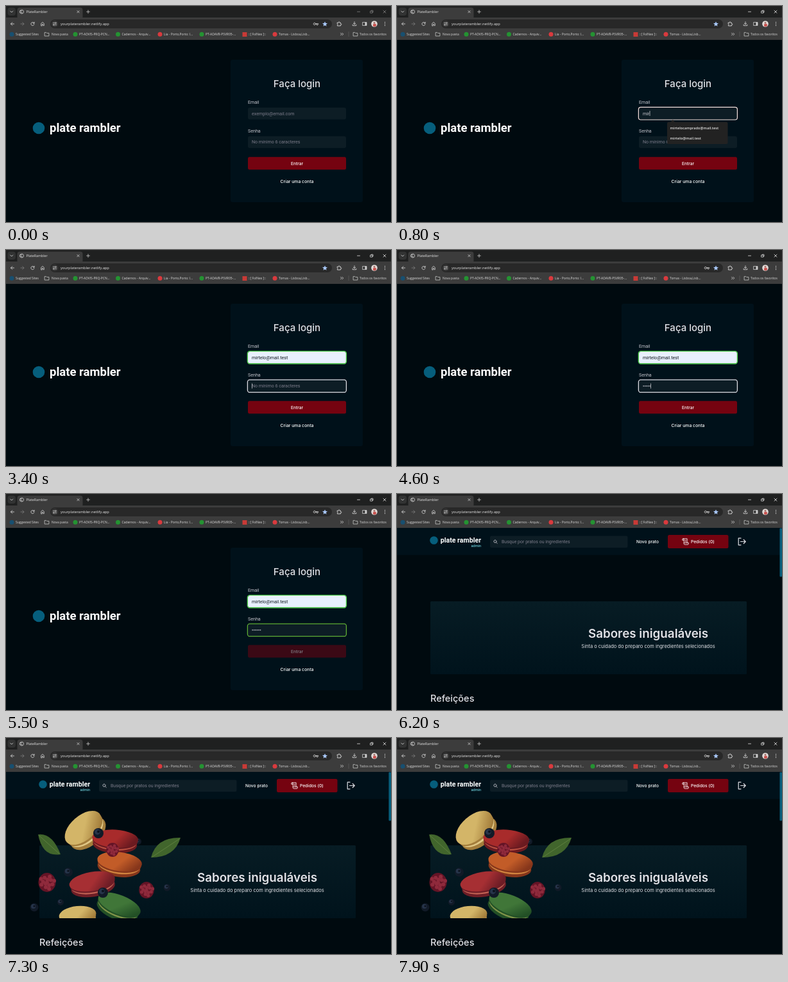
Recreate the animation shown at these times as an HTML page with a canvas. Size 600 by 338 pixels, loop 8 s.

```html
<!DOCTYPE html>
<html lang="pt-BR">
<head>
<meta charset="utf-8">
<title>PlateRambler</title>
<style>
html, body { margin: 0; width: 100%; height: 100%; overflow: hidden; background: #000a0f; }
canvas { display: block; width: 600px; height: 338px; }
</style>
</head>
<body>
<canvas id="stage"></canvas>
<script>
const W = 600, H = 338, LOOP = 8000;
const canvas = document.getElementById('stage');
const ratio = window.devicePixelRatio || 1;
canvas.width = W * ratio;
canvas.height = H * ratio;
const ctx = canvas.getContext('2d');

const UI = '"Open Sans", sans-serif';
const BODY = 'Roboto, sans-serif';
const HEAD = 'Inter, sans-serif';
const BRAND = 'plate rambler';
const USER = 'mirtelo';
const EMAIL = USER + '@mail.test';

// Moments of the story, in ms
const FOCUS = 200, KEYS = [400, 600, 800, 1000, 1200, 1400, 1600];
const HOVER = 2700, PICK = 2900, PASS_FOCUS = 3200, PASS_KEYS = 3700, KEY_GAP = 200;
const SUBMIT = 5350, HOME = 6200, ALERT = 6400, PHOTO = 6900, CLOSE = 7100;

function rect(x, y, w, h, color, r = 0) {
  ctx.fillStyle = color;
  ctx.beginPath();
  ctx.roundRect(x, y, w, h, r);
  ctx.fill();
}

function ring(x, y, w, h, color, r, width = 1) {
  ctx.strokeStyle = color;
  ctx.lineWidth = width;
  ctx.beginPath();
  ctx.roundRect(x, y, w, h, r);
  ctx.stroke();
}

function oval(x, y, rx, ry, color, angle = 0) {
  ctx.fillStyle = color;
  ctx.beginPath();
  ctx.ellipse(x, y, rx, ry, angle, 0, Math.PI * 2);
  ctx.fill();
}

const dot = (x, y, r, color) => oval(x, y, r, r, color);

function line(path, color, width = 0.9, x = 0, y = 0) {
  ctx.save();
  ctx.translate(x, y);
  ctx.strokeStyle = color;
  ctx.lineWidth = width;
  ctx.lineCap = ctx.lineJoin = 'round';
  ctx.stroke(new Path2D(path));
  ctx.restore();
}

function shape(path, color) {
  ctx.fillStyle = color;
  ctx.fill(new Path2D(path));
}

function text(str, x, y, size, color, family = UI, weight = 400, align = 'left') {
  ctx.font = `${weight} ${size}px ${family}`;
  ctx.fillStyle = color;
  ctx.textAlign = align;
  ctx.fillText(str, x, y);
  return ctx.measureText(str).width;
}

function folder(x, y) {
  line('M-3.4 2.6V-2.6H-.8L.2-1.6H3.4V2.6Z', '#c4c7c5', 0.8, x, y);
}

function drawBrowser(t) {
  const icon = '#d0d0d0';
  rect(0, 0, W, 53, '#3c3c3c');
  rect(0, 0, W, 18, '#1f2020');

  rect(2.5, 2.5, 12.5, 12.5, '#323333', 4);
  line('M-2-1L0 1L2-1', icon, 0.9, 8.7, 9);
  rect(17.5, 2.5, 102, 18, '#3c3c3c', 4);
  rect(17, 18, 104, 4, '#3c3c3c');
  line('M-3 0A3 3 0 1 1 3 0A3 3 0 1 1-3 0M-2.3-1.5Q0-.5 1-2.4M-2.7 1L0 .6L.5 2.6', icon, 0.8, 24.5, 9);
  text('PlateRambler', 31.5, 11, 5.3, '#e3e3e3');
  line('M-1.6-1.6L1.6 1.6M1.6-1.6L-1.6 1.6', icon, 0.8, 112.5, 9);
  line('M-2.4 0H2.4M0-2.4V2.4', icon, 0.8, 128, 9);

  const frame = t < FOCUS ? '#868686' : '#e8e8e8';
  line('M-2 0H2', frame, 0.8, 549.5, 9);
  line('M-2-1H1V2H-2ZM-1-1V-2H2V1H1', frame, 0.7, 570, 9);
  line('M-2-2L2 2M2-2L-2 2', frame, 0.8, 590, 9);

  line('M2.5 0H-2.5M-.2-2.3L-2.5 0L-.2 2.3', icon, 0.9, 10, 28);
  line('M-2.5 0H2.5M.2-2.3L2.5 0L.2 2.3', '#777777', 0.9, 25.5, 28);
  line('M2.3-1.2A2.6 2.6 0 1 0 2.5 .8M2.6-2.8V-.9H.7', icon, 0.9, 41.5, 28);
  line('M-2.3 2.7V-.7L0-2.8L2.3-.7V2.7H.8V.5H-.8V2.7Z', icon, 0.8, 57, 28);
  rect(69, 21, 439, 14, '#282828', 7);
  dot(76, 28, 5, '#3c3c3c');
  line('M-2.5-1.4H.4M-2.5 1.4H-1.6M.4 1.4H2.5M2.2-1.4H2.5', icon, 0.8, 76, 28);
  line('M-.7 1.4A.8 .8 0 1 0-.7 1.5M2-1.4A.8 .8 0 1 0 2-1.3', icon, 0.7, 76, 28);
  text('yourplaterambler.netlify.app', 85, 30.2, 5.7, '#e8e8e8');

  if (t < FOCUS + 100 || t >= PASS_KEYS) {
    line('M-.3 0A1.8 1.8 0 1 0-.3 .1M-.3-.5H3.6V.7H2.8V1.9H1.5V.7H-.3M-2-.1V.1', icon, 0.8, 483, 28);
  }
  shape('M497 24.2L498.1 26.8L501 27L498.8 28.9L499.5 31.7L497 30.2L494.5 31.7L495.2 28.9L493 27L495.9 26.8Z', '#a8c7fa');
  line('M-2.8-1.8H-1V-2.3A.9 .9 0 0 1 .8-2.3V-1.8H2.2V-.3H2.7A.9 .9 0 0 1 2.7 1.5H2.2V3H-2.8V1.5A1 1 0 0 0-2.8-.3Z', icon, 1, 519.2, 28);
  line('M0-3V1M-1.7-.6L0 1L1.7-.6M-2.8 1.5V3H2.8V1.5', icon, 0.9, 543, 27.7);
  line('M-3-2.5H3V2.5H-3Z', icon, 0.8, 559, 28);
  rect(559.5, 25.5, 2.5, 5, icon);
  dot(574, 28, 4.8, '#e3dcd9');
  oval(574.5, 30, 2.6, 2.3, '#c9524f');
  dot(574, 26.2, 1.5, '#a4706a');
  for (const y of [25.5, 28, 30.5]) dot(590.5, y, 0.7, icon);

  const mark = (x, color, label) => {
    dot(x, 44.2, 3.5, color);
    text(label, x + 6, 46, 4.95, '#dddddd');
  };
  mark(9, '#174f70', 'Suggested Sites');
  folder(63.5, 44);
  text('Nova pasta', 71, 46, 4.95, '#dddddd');
  mark(108, '#249332', 'PT-ADVIS-PRQ-PCN...');
  mark(174.5, '#249332', 'Cadernos - Arquiv...');
  mark(240, '#d93a3e', 'Lia - Porto,Porto: I...');
  mark(305, '#249332', 'PT-ADAVR-PSVR05-...');
  rect(368.5, 41, 7, 7, '#c83a36');
  text('::[ FolNex ]::', 378, 46, 4.95, '#dddddd');
  mark(419, '#d93a3e', 'Tomas - Lisboa,Lisb...');
  line('M-2-1.8L-.3 0L-2 1.8M.5-1.8L2.2 0L.5 1.8', icon, 0.8, 523.5, 44);
  rect(533.7, 40, 0.7, 8, '#606060');
  folder(544.5, 44);
  text('Todos os favoritos', 551, 46, 4.95, '#dddddd');
}

function caret(x, y) {
  rect(x, y - 4, 0.7, 8, '#e1e1e6');
}

function drawLogin(t) {
  rect(0, 53, W, H - 53, '#000a0f');
  dot(51, 191, 9.3, '#065e7c');
  text(BRAND, 68, 197, 18.5, '#ffffff', BODY, 700);
  rect(350, 84, 206, 223, '#00111a', 3);
  text('Faça login', 453.5, 127, 15, '#e1e1e6', HEAD, 500, 'center');
  text('Email', 377, 153.3, 7.1, '#c4c4cc', BODY);
  text('Senha', 377, 198.3, 7.1, '#c4c4cc', BODY);

  const picked = t >= PICK;
  const typed = USER.slice(0, KEYS.filter(k => t >= k).length);
  rect(377, 159, 153, 18.5, picked ? '#e8f0fe' : '#0d1d25', 3);
  if (picked) {
    text(EMAIL, 383, 170.5, 7.1, '#10181c', BODY);
    ring(376.4, 158.4, 154, 19.6, '#50cf4d', 3.5, 1.4);
  } else {
    const shown = typed || 'exemplo@email.com';
    const width = text(shown, 383, 170.5, 7.1, typed ? '#c4c4cc' : '#7c7c8a', BODY);
    if (t >= FOCUS) {
      ring(376.4, 158.4, 154, 19.6, '#f4dfdc', 3.5, 1.2);
      if (t < 2000 || t >= 2200) caret(383.3 + (typed ? width : 0), 168);
    }
  }

  const count = Math.max(0, Math.min(6, Math.floor((t - PASS_KEYS) / KEY_GAP) + 1));
  rect(377, 203.7, 153, 18.5, '#0d1d25', 3);
  if (count) {
    for (let i = 0; i < count; i++) dot(384.2 + i * 2.45, 212.8, 0.85, '#c4c4cc');
  } else {
    text('No mínimo 6 caracteres', 383, 215.3, 7.1, '#7c7c8a', BODY);
  }
  if (t >= PASS_FOCUS) {
    ring(376.4, 203.1, 154, 19.6, count === 6 ? '#5fae35' : '#dcdce2', 3.5, 1.3);
    const blink = count ? t - PASS_KEYS - (count - 1) * KEY_GAP : t - PASS_FOCUS;
    if (t < SUBMIT && blink % 1000 < 500) caret(383 + count * 2.45, 212.8);
  }

  const busy = t >= SUBMIT;
  rect(377, 236.3, 153, 19.7, busy ? '#3b0915' : '#750310', 2.5);
  text('Entrar', 453.5, 248.5, 6.6, busy ? '#82828a' : '#ffffff', HEAD, 500, 'center');
  text('Criar uma conta', 453.5, 277, 6.8, '#ffffff', HEAD, 500, 'center');

  if (t >= FOCUS + 100 && t < PICK) drawSuggestions(t);
}

function drawSuggestions(t) {
  shape('M425.5 182.5L429.8 178L434 182.5Z', '#222222');
  rect(421, 181.5, 94.5, 34.5, '#222222', 2.5);
  if (t >= HOVER) rect(421, 199, 94.5, 16, '#3a3a3a');
  text(USER + 'camprado@mail.test', 425.5, 193.3, 5.6, '#e3e3e3', UI, 600);
  text(EMAIL, 425.5, 209, 5.6, '#e3e3e3', UI, 600);
}

// A domed cap over a thin line of cream and a lower shell
function macaron(x, y, w, h, angle, shell, shade, cream) {
  ctx.save();
  ctx.translate(x, y);
  ctx.rotate(angle);
  const light = ctx.createLinearGradient(-w * 0.2, -h / 2, w * 0.25, h * 0.3);
  light.addColorStop(0, shell);
  light.addColorStop(0.5, shell);
  light.addColorStop(1, shade);
  oval(0, h * 0.12, w * 0.48, h * 0.38, shade);
  oval(0, h * 0.02, w * 0.47, h * 0.36, cream);
  oval(0, -h * 0.04, w * 0.49, h * 0.36, shade);
  oval(0, -h * 0.12, w / 2, h * 0.38, light);
  ctx.restore();
}

function berry(x, y, r) {
  dot(x, y, r, '#111a27');
  dot(x - r * 0.2, y - r * 0.25, r * 0.55, '#26344a');
  dot(x, y - r * 0.3, r * 0.25, '#0c121c');
}

function raspberry(x, y, r) {
  oval(x, y, r * 0.9, r, '#641426');
  for (let i = 0; i < 14; i++) {
    const d = r * 0.78 * Math.sqrt(i / 14), a = i * 2.4;
    dot(x + d * Math.cos(a), y + d * Math.sin(a), r * 0.2, '#8f2a3c');
  }
}

function drawPhoto() {
  ctx.save();
  ctx.beginPath();
  ctx.rect(30, 100, 260, 182);
  ctx.clip();
  shape('M50 151Q72 148 85 182Q57 187 50 151Z', '#41652c');
  line('M52 153L83 181', '#6a8b48', 0.7);
  shape('M226 187Q234 155 272 156Q263 187 226 187Z', '#41652c');
  line('M228 186L270 158', '#6a8b48', 0.7);
  berry(206, 162, 5);
  macaron(124, 145, 68, 50, -0.72, '#d3b568', '#a37d3b', '#e0c785');
  macaron(170, 162, 72, 37, 0.06, '#a82b2b', '#6b1a20', '#bd5142');
  macaron(176.5, 198, 70, 39, 0.13, '#c25c28', '#86361b', '#d2843f');
  macaron(135, 229, 72, 39, -0.17, '#a62f33', '#6e1d26', '#c26354');
  macaron(112, 281, 58, 36, -0.1, '#d3b568', '#a37d3b', '#e0c785');
  macaron(175, 265, 70, 39, 0.38, '#407638', '#235026', '#819449');
  raspberry(64, 226, 15);
  raspberry(219, 238, 13);
  raspberry(166, 175, 11);
  berry(144, 149, 8);
  berry(151, 242, 8);
  berry(97, 210, 7);
  berry(44, 265, 6.5);
  berry(251, 234, 5.5);
  berry(85, 257, 5);
  ctx.restore();
}

function drawHome(t) {
  rect(0, 53, W, H - 53, '#000a0f');
  rect(0, 53, W, 42.5, '#00111a');
  dot(57.5, 72.5, 6.3, '#065e7c');
  text(BRAND, 67.7, 76, 10.6, '#ffffff', BODY, 700);
  text('admin', 131, 82.5, 5.6, '#82f3ff', BODY, 400, 'right');
  rect(145, 65.5, 214.5, 18.5, '#0d1d25', 2.5);
  line('M1.6-.4A2.1 2.1 0 1 0 1.6-.3M1.1 1.2L2.7 2.8', '#c4c4cc', 0.9, 153.5, 74.5);
  text('Busque por pratos ou ingredientes', 163, 77.3, 7, '#7c7c8a', BODY);
  text('Novo prato', 390.5, 77, 6.7, '#ffffff', HEAD, 500, 'center');
  rect(422, 64, 94.5, 21, '#750310', 2.5);
  line('M-2.3 1.8V-3.4A1.2 1.2 0 0 0-4.7-3.4V-2.2H-2.3M-3.5-4.6H2.6V1.8M-1 1.8H4.8V3.3A1.3 1.3 0 0 1 3.5 4.6H-1A1.3 1.3 0 0 1-2.3 3.3V1.8M-.4-2.2H1M-.4-.2H1', '#ffffff', 0.85, 449.5, 74.5);
  text('Pedidos (0)', 476.3, 77, 6.7, '#ffffff', HEAD, 500, 'center');
  line('M-1.5-5.3H-5.3V5.3H-1.5M-2 0H5.7M2.8-3L5.7 0L2.8 3', '#e1e1e6', 1.2, 537.5, 74.5);
  rect(596.5, 53.5, 3.5, 76, '#065e7c', 1);

  const fade = ctx.createLinearGradient(0, 168, 0, 282);
  fade.addColorStop(0, '#071c24');
  fade.addColorStop(1, '#00131c');
  rect(52, 168, 493, 114, fade, 1.5);
  text('Sabores inigualáveis', 391.5, 225, 18.8, '#e1e1e6', HEAD, 600, 'center');
  text('Sinta o cuidado do preparo com ingredientes selecionados', 391.5, 240.7, 7.5, '#e1e1e6', HEAD, 400, 'center');
  text('Refeições', 52, 325, 14.5, '#e1e1e6', HEAD, 500);
  if (t >= PHOTO) drawPhoto();
}

function drawAlert() {
  ctx.save();
  ctx.shadowColor = '#000000';
  ctx.shadowBlur = 5 * ratio;
  rect(201.5, 37, 197, 141, '#1f1f1f', 4);
  ctx.restore();
  ring(201.5, 37, 197, 141, '#414141', 4, 0.6);

  rect(202, 37.3, 196, 51, '#252627', [4, 4, 0, 0]);
  line('M202 74Q211 67 220 75T240 76T254 82M313 74C328 84 333 60 342 70S350 85 363 78S380 82 398 72M314 44Q325 38 337 47T359 41', '#393b3d', 2.5);
  line('M0-4V4M-3.5-2L3.5 2M-3.5 2L3.5-2', '#707274', 0.9, 225, 61);
  shape('M380.5 67A4.5 4.5 0 0 1 389 67Z', '#515355');
  rect(250, 43, 35, 42, '#3a3c3f', 2);
  rect(260, 40, 15, 6, '#525559', 2);
  rect(273, 50, 41, 32, '#17191b', 2);
  ring(273, 50, 41, 32, '#4a4d50', 2, 0.8);
  rect(277, 60, 33, 12, '#25292d', 1.5);
  for (const x of [282, 287, 292]) dot(x, 66, 1.7, '#8fb7d1');
  rect(296, 63, 0.9, 6, '#d6e1e8');
  shape('M265.5 56L277 75H254Z', '#e9776f');
  rect(264.7, 62, 1.6, 6.5, '#441e1d');
  dot(265.5, 71.5, 0.9, '#441e1d');

  text('Mude sua senha', 210, 105.5, 6.5, '#f0f0f0', UI, 700);
  [
    'A senha que você usou foi encontrada em um vazamento de dados. O',
    'Gerenciador de senhas do Nuvoxa recomenda que você mude essa senha',
    'imediatamente.'
  ].forEach((row, i) => text(row, 210, 121.3 + i * 9, 5, '#d0d0d0'));

  line('M-3 0A3 3 0 1 1 3 0A3 3 0 1 1-3 0M0-.2V1.5M0-1.5V-1.4', '#c7c7c7', 0.8, 215.5, 160.7);
  ring(360, 151.2, 31, 19, '#c5e0f0', 9.5, 1);
  rect(362, 153, 27, 15.4, '#a6c5d5', 7.7);
  text('OK', 375.5, 162.6, 5.4, '#173645', UI, 600, 'center');
}

function draw(t) {
  ctx.setTransform(ratio, 0, 0, ratio, 0, 0);
  if (t < HOME) drawLogin(t);
  else drawHome(t);
  drawBrowser(t);
  if (t >= ALERT && t < CLOSE) drawAlert();
}

const start = performance.now();
function tick() {
  draw((performance.now() - start) % LOOP);
  requestAnimationFrame(tick);
}
tick();
</script>
</body>
</html>
```
